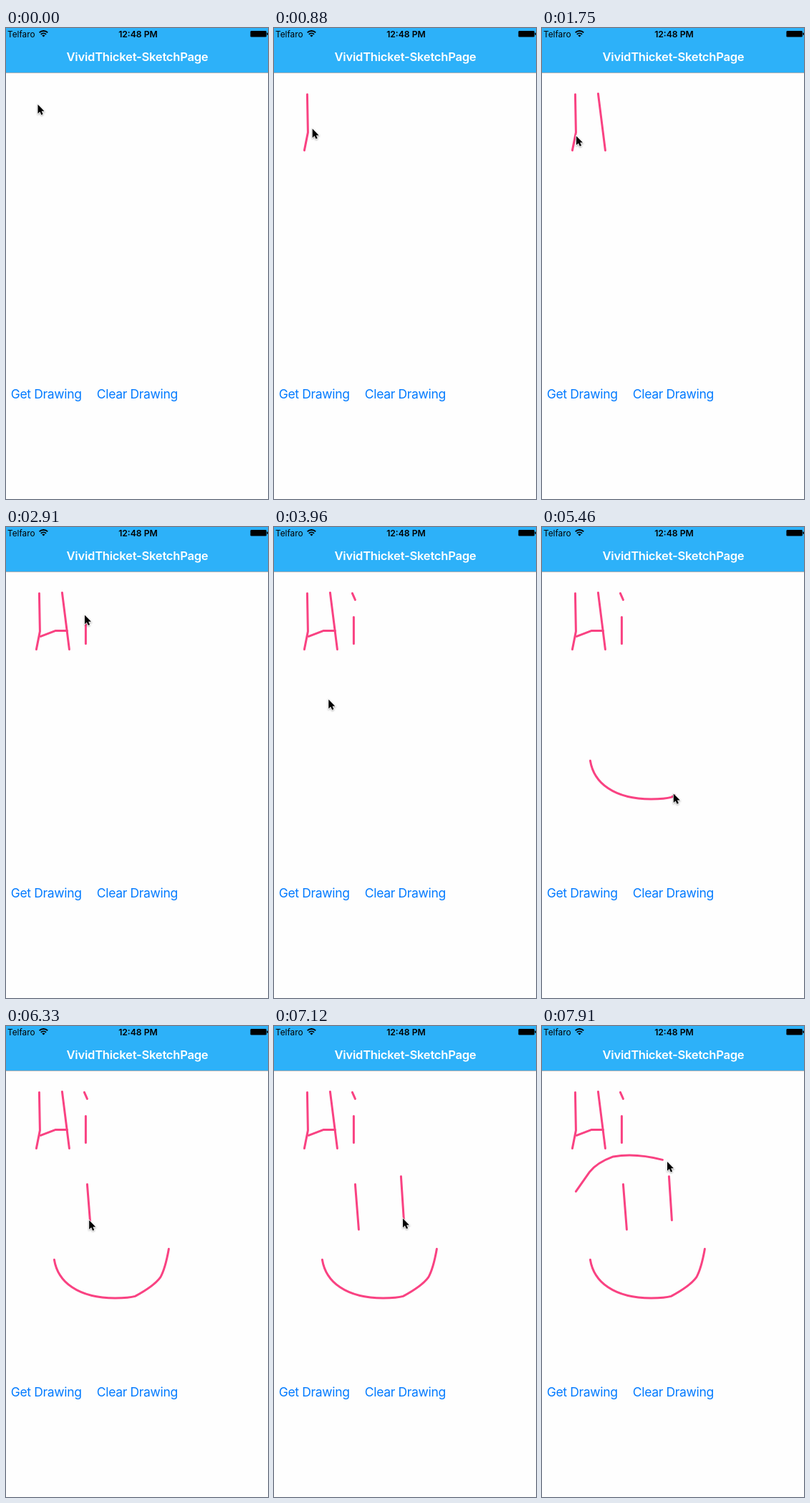
These frames come from a looping animation (366 by 656 pixels, 7.99 s). An HTML page:

```html
<!DOCTYPE html>
<html lang="en">
<head>
<meta charset="utf-8">
<title>Sketch page</title>
<style>
  html, body { margin: 0; width: 100%; height: 100%; overflow: hidden; background: #fefefe; }
  svg { display: block; font-family: Inter, "Open Sans", sans-serif; }
  .status { font-size: 11.8px; }
  .clock { font-size: 12.2px; font-weight: 600; }
  .title { font-size: 16.6px; font-weight: 600; letter-spacing: -.25px; fill: #fff; }
  .button { font-size: 17.5px; letter-spacing: -.34px; fill: #007aff; }
  .mid { text-anchor: middle; }
  #ink { fill: none; stroke: #f94282; stroke-width: 3; stroke-linecap: round; stroke-linejoin: round; }
  #cursor { filter: drop-shadow(0 1px 1px rgba(0, 0, 0, .35)); }
</style>
</head>
<body>
<svg width="366" height="656" viewBox="0 0 366 656">
  <rect width="366" height="656" fill="#fefefe"/>
  <rect width="366" height="62" fill="#2db1f9"/>
  <rect y="62" width="366" height="1" fill="#b2b2b2"/>

  <text class="status" x="2" y="12.7">Telfaro</text>
  <path d="M46.6 6.4a8.2 8.2 0 0 1 11.6 0M48.8 8.9a5.1 5.1 0 0 1 7.2 0"
        fill="none" stroke="#000" stroke-width="1.9"/>
  <path d="M52.4 12.6L50.3 10.5a3 3 0 0 1 4.2 0Z"/>
  <text class="clock mid" x="184.5" y="12.7">12:48 PM</text>
  <rect x="341.4" y="4" width="22.4" height="8.6" rx="1.4"/>
  <rect x="364.5" y="6.6" width="1.5" height="3.4" rx=".7"/>

  <text class="title mid" x="183.5" y="46">VividThicket-SketchPage</text>
  <text class="button" x="6.7" y="515.5">Get Drawing</text>
  <text class="button" x="126.8" y="515.5">Clear Drawing</text>

  <g id="ink" transform="translate(.4 .4)"></g>
  <path id="cursor" d="M0 0V12.7L2.9 10 4.9 14.4 7.1 13.4 5.2 9.2H9Z"
        stroke="#fff" stroke-width="1.4" paint-order="stroke"/>
</svg>
<script>
const LOOP = 7990, STEPS = 91, STEP = LOOP / STEPS;
const ink = document.getElementById("ink");
const cursor = document.getElementById("cursor");

// A motion follows a path from one step to another, with or without ink.
function motion(start, end, d, visibility = "visible") {
  const path = document.createElementNS("http://www.w3.org/2000/svg", "path");
  path.setAttribute("d", d);
  path.style.visibility = visibility;
  ink.append(path);
  return { start, end, path, length: path.getTotalLength() };
}
const stroke = (start, end, d) => motion(start, end, d);
const hover = (start, end, d) => motion(start, end, d, "hidden");

const motions = [
  hover(0, 0, "M45.5 108.5h0"),
  // Letter H
  stroke(3, 8, "M46 92L47 145 42 170"),
  stroke(13, 17, "M78 91L88 170"),
  stroke(20.3, 25, "M48 152L69 144H85"),
  // Letter i
  stroke(29, 32.8, "M111 162V125"),
  stroke(36, 38, "M109 92L113 101"),
  // Wander down to the mouth
  hover(39, 47, "M113 101C90 200 78 270 50 281"),
  hover(49, 56, "M50 281C-10 310 140 368 67 325"),
  // Mouth, eyes, brow
  stroke(57, 64.8, "M67 325C72 356 100 378.5 152 378.5Q172 378.5 180 376Q206 362 215 350Q222 338 227 310"),
  stroke(69, 72.6, "M113 220L118 283"),
  stroke(77, 81, "M177 209L181 270"),
  stroke(86.8, 89.8, "M47 230L66 203Q76 190 99 181.5Q130 176 168 186"),
  hover(90, 90, "M176 191h0"),
];

const clamp = k => Math.max(0, Math.min(1, k));
const smooth = k => k * k * (3 - 2 * k);
const progress = ({ start, end }, step) => end > start ? clamp((step - start) / (end - start)) : 1;
const pointOn = ({ path, length }, k) => path.getPointAtLength(length * k);

// The pointer follows the current path, then glides to the start of the next.
function pointerAt(step) {
  const index = motions.findLastIndex(m => m.start <= step);
  const current = motions[index], next = motions[index + 1];
  const from = pointOn(current, progress(current, step));
  if (step <= current.end || !next) return from;
  const to = pointOn(next, 0);
  const k = smooth((step - current.end) / (next.start - current.end));
  return { x: from.x + (to.x - from.x) * k, y: from.y + (to.y - from.y) * k };
}

function draw(now) {
  const step = Math.min(STEPS - 1, Math.floor((now % LOOP + 7) / STEP));
  for (const m of motions) {
    m.path.style.strokeDasharray = `${m.length * progress(m, step)} 999`;
    m.path.style.opacity = m.start < step ? 1 : 0;
  }
  const { x, y } = pointerAt(step);
  cursor.setAttribute("transform", `translate(${x - 1} ${y - 2})`);
}

function tick() {
  draw(performance.now());
  requestAnimationFrame(tick);
}
tick();
</script>
</body>
</html>
```
